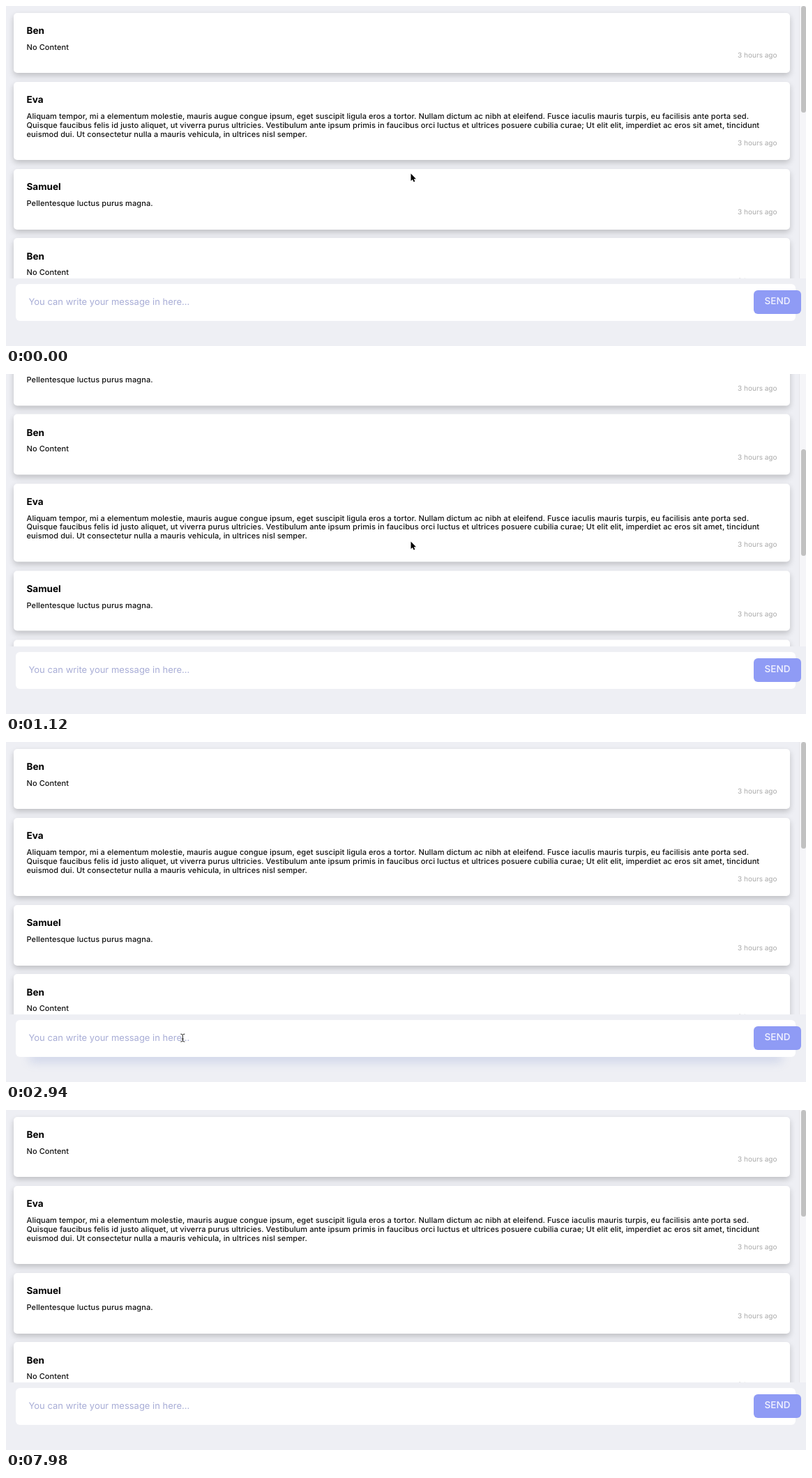
An HTML page that plays this animation: 1147x488 px, repeating every 8.4 s.

```html
<!DOCTYPE html>
<html lang="en">
<head>
<meta charset="utf-8">
<title>Message list</title>
<style>
  html, body { margin: 0; width: 100%; height: 100%; overflow: hidden; background: #eeeff4; }
  body {
    position: relative;
    font-family: Inter, "Open Sans", sans-serif;
    text-rendering: geometricPrecision;
    white-space: nowrap;
    cursor: default;
  }
  #view { position: absolute; left: 0; top: 0; width: 1147px; height: 391px; overflow: hidden; }
  #list { position: absolute; left: 11px; top: 9.5px; width: 1113px; }
  .card {
    box-sizing: border-box;
    padding: 17.5px 18.5px 18.8px;
    margin-bottom: 12.6px;
    background: #fff;
    border-radius: 5px;
    box-shadow: 0 4px 8px rgba(0, 0, 0, .2);
  }
  .card b { display: block; font-size: 13.5px; line-height: 18px; margin-bottom: 7.5px; color: #000; }
  .card p { margin: 0; font-size: 11px; font-weight: 500; line-height: 12.9px; letter-spacing: .1px; color: #111; }
  .card time { display: block; font-size: 10px; line-height: 12px; text-align: right; color: #aaa; }
  #bar {
    position: absolute; left: 1137px; top: 0; width: 9px; height: 391px;
    background: #f5f5f8; border-left: 1px solid #e6e6ea;
  }
  #thumb { position: absolute; left: 1.5px; top: 0; width: 7px; height: 153px; border-radius: 3.5px; background: #c1c1c1; }
  #foot { position: absolute; left: 0; top: 391px; width: 1147px; height: 97px; background: #eeeff4; }
  #box, #glow {
    position: absolute; left: 14px; top: 8px; width: 1118px; height: 53px; border-radius: 6px;
  }
  #glow { box-shadow: 0 27px 14px -20px rgba(120, 140, 205, .28); }
  #box { background: #fff; }
  #field { position: absolute; left: 18.5px; top: 0; font-size: 13px; line-height: 53px; }
  #send {
    position: absolute; left: 1072px; top: 17px; width: 68px; height: 33.5px;
    border-radius: 6px; text-align: center;
    font-size: 13.5px; font-weight: 500; line-height: 33.5px; color: #f5f5ff;
  }
  #pointer { position: absolute; left: 0; top: 0; width: 1147px; height: 488px; overflow: hidden; }
</style>
</head>
<body>
<div id="view">
  <div id="list"></div>
  <div id="bar"><div id="thumb"></div></div>
</div>
<div id="foot">
  <div id="glow"></div>
  <div id="box"><span id="field"></span></div>
  <div id="send">SEND</div>
</div>
<svg id="pointer" viewBox="0 0 1147 488">
  <path id="arrow" d="M0 0V10.6L2.5 8.4L4.1 12L5.8 11.2L4.2 7.7H7.4Z" fill="#000" stroke="#fff" stroke-width="1" paint-order="stroke"/>
  <path id="beam" d="M-3-5.5Q0-5.5 0-4V4Q0 5.5-3 5.5M3-5.5Q0-5.5 0-4M0 4Q0 5.5 3 5.5M-1.5 1.5H1.5" fill="none" stroke="#222" stroke-width="1"/>
</svg>
<script>
const $ = id => document.getElementById(id);
const LOOP = 8400, TICK = 140, THUMB_RATIO = 0.392;

const posts = [
  ["Ben", "No Content"],
  ["Eva", "Aliquam tempor, mi a elementum molestie, mauris augue congue ipsum, eget suscipit ligula eros a tortor. Nullam dictum ac nibh at eleifend. Fusce iaculis mauris turpis, eu facilisis ante porta sed.<br>" +
    "Quisque faucibus felis id justo aliquet, ut viverra purus ultricies. Vestibulum ante ipsum primis in faucibus orci luctus et ultrices posuere cubilia curae; Ut elit elit, imperdiet ac eros sit amet, tincidunt<br>" +
    "euismod dui. Ut consectetur nulla a mauris vehicula, in ultrices nisl semper."],
  ["Samuel", "Pellentesque luctus purus magna."]
];
const card = ([name, text]) =>
  `<div class="card"><b>${name}</b><p>${text}</p><time>3 hours ago</time></div>`;
$("list").innerHTML = posts.map(card).join("").repeat(3);

// Keys are [tick, value, ...], one tick being 140 ms.
const scrollKeys = [[0, 0], [1, 25], [2, 90], [3, 138.4], [4, 142], [5, 142], [6, 190], [7, 250],
  [8, 275.5], [9, 276.3], [14, 276.3], [15, 225], [16, 110], [17, 25], [18, 0]];
const focusKeys = [[16, 0], [18, 1], [43, 1], [45, 0]];
const hoverKeys = [[41, 0], [42, 1], [45, 1], [47, 0]];

// Each path is one stretch during which the pointer is visible.
const paths = [
  [[0, 580.5, 240.5], [9, 580.5, 240.5], [10, 560, 330], [11, 480, 452], [12, 330, 400], [13, 230, 330],
    [14, 201.5, 308.5], [16, 201.5, 308.5], [17, 215, 395], [18, 230, 426], [20, 230, 426], [23, 300, 422]],
  [[30, 640, 432], [31, 650, 465], [32, 653, 486.5]],
  [[36, 656, 472], [38, 760, 452], [40, 960, 436], [42, 1100, 425], [44, 1100, 425], [45, 1044.5, 427],
    [47, 1030, 432], [48, 1030, 432], [51, 1020, 446], [53, 1012, 467], [55, 1024, 424], [56, 1026, 404]]
];

function at(keys, n) {
  const i = keys.findIndex(k => k[0] > n);
  if (i === 0) return keys[0].slice(1);
  if (i < 0) return keys[keys.length - 1].slice(1);
  const a = keys[i - 1], b = keys[i], u = (n - a[0]) / (b[0] - a[0]);
  return a.slice(1).map((v, j) => v + (b[j + 1] - v) * u);
}

function typed(n) {
  if (n < 24 || n >= 49) return "";
  return "Test".slice(0, n < 28 ? 1 : n < 29 ? 2 : n < 30 ? 3 : 4);
}

function drawPointer(n) {
  const path = paths.find(p => n >= p[0][0] && n <= p[p.length - 1][0]);
  const [x, y] = path ? at(path, n) : [-50, -50];
  const overField = y > 398 && y < 452 && x > 14 && x < 1072;
  for (const [id, on] of [["arrow", !overField], ["beam", overField]]) {
    $(id).setAttribute("visibility", path && on ? "visible" : "hidden");
    $(id).setAttribute("transform", `translate(${x} ${y})`);
  }
}

function draw(n) {
  const [scroll] = at(scrollKeys, n), [focus] = at(focusKeys, n), [hover] = at(hoverKeys, n);
  $("list").style.transform = `translateY(${-scroll}px)`;
  $("thumb").style.transform = `translateY(${scroll * THUMB_RATIO}px)`;
  $("glow").style.opacity = focus;

  const text = typed(n);
  $("field").textContent = text || "You can write your message in here...";
  $("field").style.color = text ? "#3c3b7a" : "#a8add6";

  const send = $("send").style;
  send.transform = `translateY(${-2 * hover}px)`;
  send.background = `rgb(${143 - 19 * hover}, ${155 - 16 * hover}, 245)`;
  send.boxShadow = `0 4px 10px rgba(40, 40, 80, ${0.2 * hover})`;
  drawPointer(n);
}

// The picture advances in whole ticks.
let shown = -1;
function frame() {
  const n = Math.floor(performance.now() % LOOP / TICK);
  if (n !== shown) draw(shown = n);
  requestAnimationFrame(frame);
}
frame();
</script>
</body>
</html>
```
